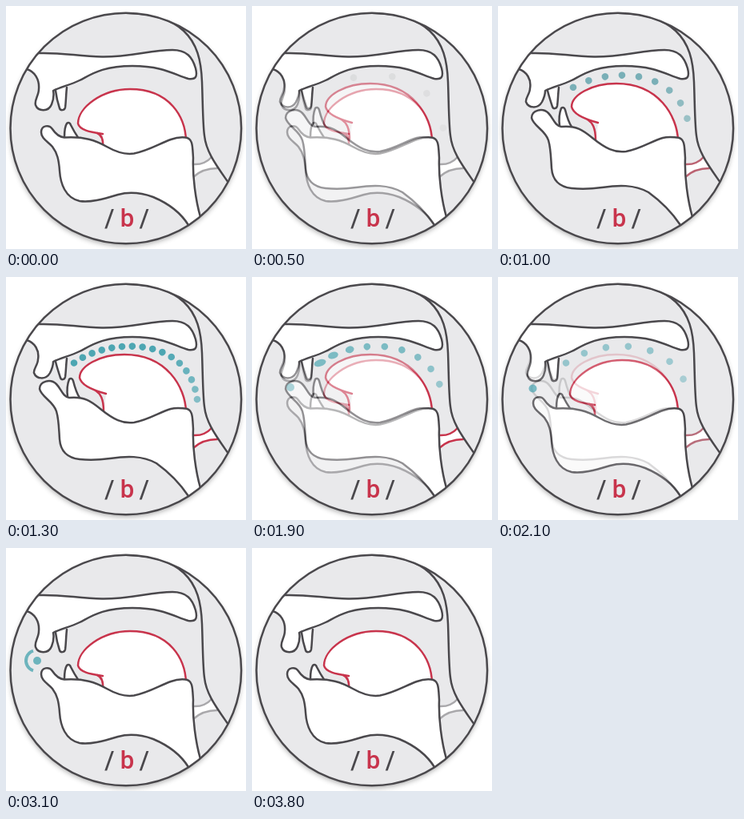
Write an HTML page with a canvas that moves like this. It is 300x304 px and loops after 4000 ms.

```html
<!DOCTYPE html>
<html lang="en">
<head>
<meta charset="utf-8">
<title>Articulation of /b/</title>
<style>
  html, body { margin: 0; width: 100%; height: 100%; overflow: hidden; background: #fff; }
  canvas { display: block; }
</style>
</head>
<body>
<canvas id="stage" width="300" height="304"></canvas>
<script>
const LOOP = 4000, STEP = 100;
const INK = '#4a484c', RED = '#c8344c', GREY = '#e9e9eb', FOLD = '#a9a8ab', TEAL = '#4da6b2';
const CX = 149.8, CY = 153, R = 144.3;
const LINE = 2.5;

const ctx = document.getElementById('stage').getContext('2d');

const palateTop = 'M-5 59L41 59C70 58 90 63 120 63.5C155 64 180 55 208 55' +
  'C226 55 233 64 237 78C240 90 236 92 228 91C212 87 198 75 158 75C120 75 106 86 92 93C80 99 68 101 59 106';
const jawBack = 'C234 165 233 177 234 190C233 213 237 243 243 264L250 300L236 300L228 274';
const throat = 'M150 8.7C185 9 208 18 222 31C239 47 244 68 245 95C246 122 246 148 248 162C250 182 262 198 278 221';
const foldUpper = 'M234 198Q248 199 257 189';
const foldLower = 'M234 214Q246 203 264 203';
const foldFill = 'M234 198Q248 199 257 189L264 203Q246 203 234 214Z';

const poses = {
  open: {
    lip: 'C60 111 59 118 57 123C53 133 40 132 37 124C35 118 41 112 41 104C42 92 36 82 26 79L-5 79Z',
    upperTooth: 'M62 106C63 114 65 122 67 128C68 131 73 131 74 127C75 120 75 110 76 102',
    lowerTooth: 'M73 164C73 158 74 150 76 147C78 145 80 146 81 149C84 155 87 160 91 166',
    tongue: 'M225 168C224 140 206 104 155 104C120 104 90 127 90 147C92 156 108 158 121 160',
    tip: 'M114 159C119 161 122 166 121 177',
    tongueFill: 'L121 178L170 190L226 180Z',
    jaw: 'M44 158C44 149 54 148 58 154C62 160 66 164 73 164.5C98 163 112 168 126 176' +
      'C140 184 150 186 160 184.5C178 181 192 172 206 167C214 164 219 164 224 164.5' + jawBack +
      'C218 258 203 247 184 239C170 234 155 232 140 236C120 242 105 246 92 244' +
      'C74 240 68 222 67 206C66 192 64 184 58 176C53 170 44 166 44 158Z'
  },
  closed: {
    lip: 'C59 110 57 116 55 120C50 129 38 128 35 120C34 115 40 110 40 103C42 92 36 82 26 79L-5 79Z',
    upperTooth: 'M62 106C64 114 66 120 68 126C69 129 73 129 74 125C75 118 75 110 76 102',
    lowerTooth: 'M77 150C76 142 77 133 79 128C81 126 83 127 84 130C86 138 88 145 92 151',
    tongue: 'M225 168C224 138 201 97 148 97C116 97 92 112 92 126C94 136 110 142 125 146',
    tip: 'M112 142C118 146 122 152 122 168',
    tongueFill: 'L122 172L170 190L226 180Z',
    jaw: 'M42 140C42 130 56 127 63 134C69 140 71 150 79 151C98 149 107 156 118 165' +
      'C134 178 146 184 160 182C178 179 192 169 206 165C213 163 218 164 224 164.5' + jawBack +
      'C218 259 206 246 188 233C170 223 150 224 130 227C115 229 103 229 92 228' +
      'C74 226 68 216 67 203C66 188 66 178 63 168C59 155 44 150 42 140Z'
  }
};

const airway = document.createElementNS('http://www.w3.org/2000/svg', 'path');
airway.setAttribute('d', 'M85 107.5C128 76 228 72 239 153');
const airwayLength = airway.getTotalLength();
const tightGap = airwayLength / 15;

// Piecewise linear value through [time, value] pairs.
function track(t, keys) {
  if (t <= keys[0][0]) return keys[0][1];
  for (let i = 1; i < keys.length; i++) {
    const [t0, v0] = keys[i - 1], [t1, v1] = keys[i];
    if (t < t1) return v0 + (v1 - v0) * (t - t0) / (t1 - t0);
  }
  return keys[keys.length - 1][1];
}

function mix(a, b, k) {
  return `rgb(${a.map((v, i) => Math.round(v + (b[i] - v) * k)).join(',')})`;
}

function shape(c, d, fill, stroke) {
  const path = new Path2D(d);
  if (fill) { c.fillStyle = fill; c.fill(path); }
  if (stroke) { c.strokeStyle = stroke; c.stroke(path); }
}

function disc(c, x, y, r) {
  c.beginPath();
  c.arc(x, y, r, 0, Math.PI * 2);
}

function label(c, text, x, color) {
  c.fillStyle = color;
  c.font = '500 31px Roboto, sans-serif';
  c.fillText(text, x, 276);
}

function renderPose(pose, foldColor) {
  const canvas = document.createElement('canvas');
  canvas.width = 300;
  canvas.height = 304;
  const c = canvas.getContext('2d');
  c.fillStyle = '#fff';
  c.fillRect(0, 0, 300, 304);
  c.lineWidth = LINE;
  c.lineCap = c.lineJoin = 'round';

  c.save();
  c.shadowColor = 'rgba(0,0,0,.32)';
  c.shadowBlur = 6;
  c.shadowOffsetY = 3;
  c.fillStyle = GREY;
  disc(c, CX, CY, R);
  c.fill();
  c.restore();

  c.save();
  disc(c, CX, CY, R);
  c.clip();
  shape(c, foldFill, '#fff');
  shape(c, foldUpper, null, foldColor);
  shape(c, foldLower, null, foldColor);
  shape(c, throat, null, INK);
  shape(c, pose.upperTooth, '#fff', INK);
  shape(c, palateTop + pose.lip, '#fff', INK);
  shape(c, pose.tongue + pose.tongueFill, '#fff');
  shape(c, pose.tongue, null, RED);
  shape(c, pose.tip, null, RED);
  shape(c, pose.lowerTooth, '#fff', INK);
  shape(c, pose.jaw, '#fff', INK);
  c.restore();

  c.strokeStyle = INK;
  disc(c, CX, CY, R);
  c.stroke();

  c.textAlign = 'center';
  label(c, '/', 129.5, INK);
  label(c, 'b', 151.5, RED);
  label(c, '/', 173, INK);
  return canvas;
}

const openView = renderPose(poses.open, FOLD);
const closedView = renderPose(poses.closed, FOLD);
const voicedView = renderPose(poses.closed, RED);

function drawFolds(t) {
  ctx.save();
  ctx.beginPath();
  ctx.rect(230, 186, 38, 30);
  ctx.clip();
  ctx.globalAlpha = track(t, [[700, 0], [1200, 1], [1900, 1], [2300, 0]]);
  ctx.drawImage(voicedView, 0, 0);
  ctx.restore();
}

// Air packs together while the lips are shut and thins out after release.
function drawAir(t) {
  const alpha = track(t, [[400, 0], [500, .28], [700, 1], [1700, 1], [1900, .7], [2500, .22], [2800, 0]]);
  if (!alpha) return;
  let gap, start;
  if (t < 1700) {
    gap = tightGap * Math.exp(Math.max(0, 1300 - t) / 600);
    start = (gap - tightGap) * 1.28;
  } else {
    gap = track(t, [[1700, tightGap], [1900, 22], [2500, 40], [2900, 50]]);
    start = track(t, [[1700, 0], [1900, -3], [2500, 0]]);
  }
  const smear = track(t, [[1700, 0], [1900, 1.1], [2100, 0]]);
  ctx.fillStyle = mix([188, 189, 190], [77, 166, 178], track(t, [[700, 0], [1200, 1]]));
  for (let k = 0; start + k * gap <= airwayLength + 1; k++) {
    const s = Math.max(0, start + k * gap);
    const p = airway.getPointAtLength(s);
    ctx.globalAlpha = alpha * track(s / airwayLength, [[.6, 1], [1, .65]]);
    ctx.beginPath();
    ctx.ellipse(p.x, p.y, 4.3 + smear * Math.max(0, 3 - k), 4.3, -.3, 0, Math.PI * 2);
    ctx.fill();
  }
  ctx.globalAlpha = 1;
}

function drawBurst(t) {
  const fade = track(t, [[3000, 1], [3500, 0]]);
  ctx.fillStyle = ctx.strokeStyle = TEAL;
  ctx.globalAlpha = fade * track(t, [[1700, 0], [1900, .45], [2300, 1]]);
  disc(ctx, track(t, [[1800, 50], [1900, 48], [2300, 39]]), track(t, [[1900, 138], [2300, 141]]), 5);
  ctx.fill();
  ctx.globalAlpha = fade * track(t, [[2200, 0], [2500, 1]]);
  ctx.lineWidth = 4;
  ctx.beginPath();
  ctx.arc(38, 141, 13, Math.PI * .6, Math.PI * 1.4);
  ctx.stroke();
  ctx.globalAlpha = 1;
}

function draw(t) {
  ctx.drawImage(openView, 0, 0);
  ctx.globalAlpha = track(t, [[250, 0], [700, 1], [1700, 1], [2200, 0]]);
  ctx.drawImage(closedView, 0, 0);
  ctx.globalAlpha = 1;
  drawFolds(t);
  drawAir(t);
  drawBurst(t);
}

const began = performance.now();
function tick() {
  const t = (performance.now() - began) % LOOP;
  draw(Math.floor(t / STEP) * STEP);
  requestAnimationFrame(tick);
}
tick();
</script>
</body>
</html>
```
